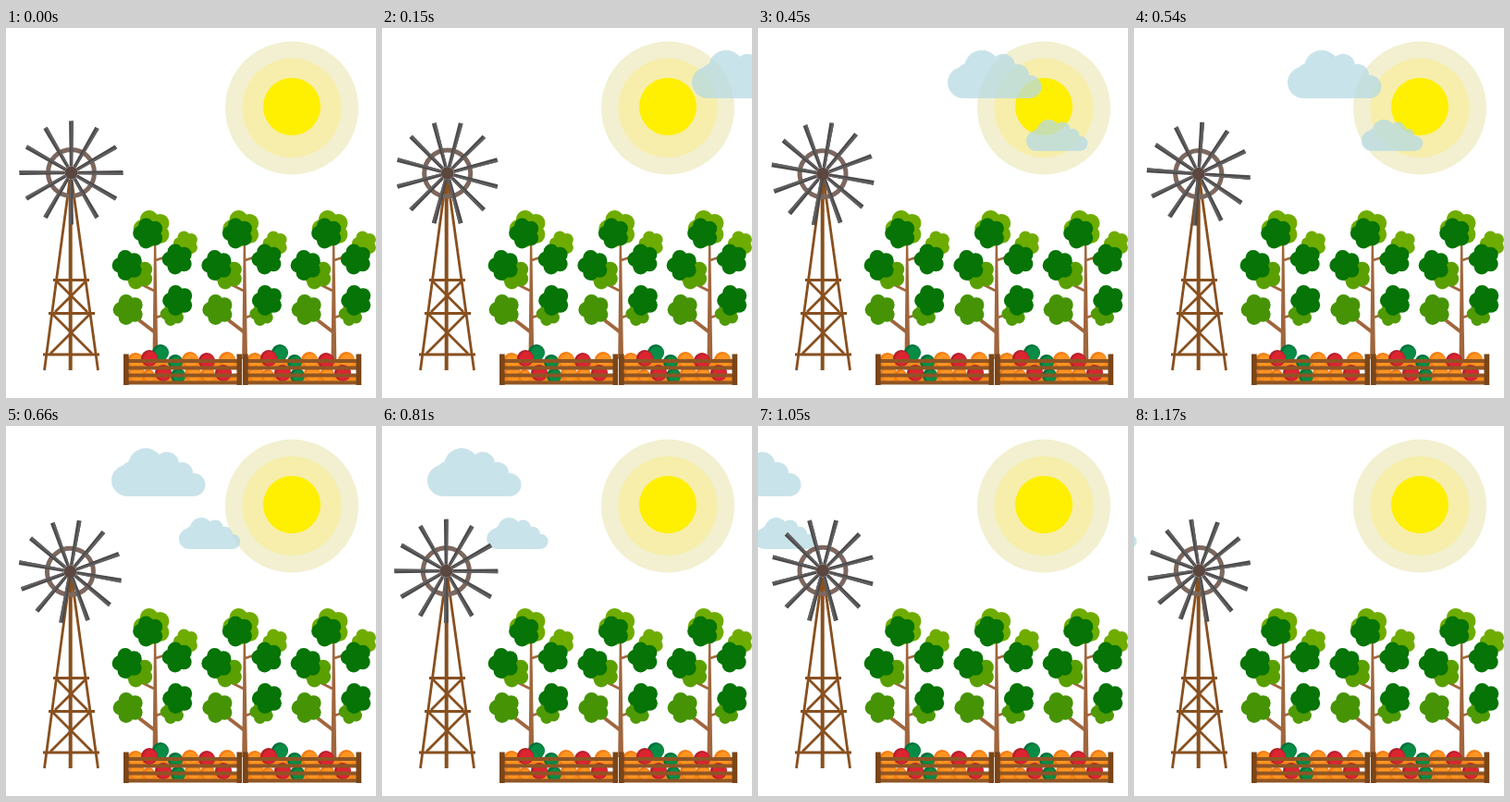
An HTML page for the animation above (1.2 s loop, 400 by 400 pixels).

```html
<!DOCTYPE html>
<html lang="en">
<head>
<meta charset="utf-8">
<title>Farm</title>
<style>
html, body { margin: 0; height: 100%; overflow: hidden; background: #fff; }
svg { display: block; width: 100vw; height: 100vh; }
</style>
</head>
<body>
<svg viewBox="0 0 400 400">
  <defs>
    <g id="cloud" fill="#b7dae4" opacity=".75">
      <circle cx="17" cy="59" r="17"/><circle cx="22" cy="50" r="12"/>
      <circle cx="37" cy="43" r="19"/><circle cx="60" cy="41" r="13"/>
      <circle cx="76" cy="51" r="12"/><circle cx="89" cy="63.5" r="12.5"/>
      <path d="M17 50H30V42H62V51H89V76H17Z"/>
    </g>
    <g id="tree"></g>
    <g id="crate"></g>
  </defs>

  <circle cx="309" cy="86.5" r="72" fill="#f2f0d0"/>
  <circle cx="309" cy="86.5" r="53.7" fill="#f6eeaa"/>
  <circle cx="309" cy="85" r="31" fill="#ffef00"/>

  <g id="big"><use href="#cloud"/></g>
  <g id="small"><use href="#cloud" transform="translate(0 83.3) scale(.654)"/></g>

  <g fill="none" stroke="#88501f" stroke-width="2.8">
    <path d="M69 164L41.5 370M71 164L99.5 370"/>
    <path d="M69.7 164V370" stroke-width="4"/>
    <path d="M51 272.5H90M46 308.5H96M40 353H101" stroke-width="3"/>
    <path d="M55 274L88 307M86 274L53 307M50 309L93 352M91 309L48 352"/>
  </g>
  <g id="rotor"></g>

  <use href="#tree"/><use href="#tree" x="96.7"/><use href="#tree" x="193"/>
  <use href="#crate"/><use href="#crate" x="129"/>
</svg>
<script>
const $ = id => document.getElementById(id);
const circle = (x, y, r, fill) => `<circle cx="${x}" cy="${y}" r="${r}" fill="${fill}"/>`;
const rect = (x, y, w, h, fill) => `<rect x="${x}" y="${y}" width="${w}" height="${h}" fill="${fill}"/>`;

// Leaf cluster: five petals around a core
function leaf(x, y, size, fill) {
  let out = circle(x, y, size * .6, fill);
  for (let i = 0; i < 5; i++) {
    const a = (36 + i * 72) * Math.PI / 180;
    out += circle(x + Math.cos(a) * size * .52, y + Math.sin(a) * size * .52, size * .5, fill);
  }
  return out;
}

const dark = '#067406', mid = '#469405', light = '#6fac00';
$('tree').innerHTML =
  `<g fill="none" stroke="#a0663d">
    <path d="M161 329L144 316" stroke-width="4"/>
    <path d="M160 284L146 277M162 313L178 308M162 251L174 247" stroke-width="2.8"/>
  </g>
  <path d="M160 232H162.3L164.3 358H158.5Z" fill="#a0663d"/>` +
  [
    [158, 217, 20, light], [194.5, 233, 13.5, light],
    [143, 266, 16.5, '#5a9f00'], [180, 309, 13, '#4f9a05'],
    [154, 222, 16.5, dark], [185.5, 250, 16.5, dark],
    [131.5, 256.5, 16.5, dark], [132.5, 304.5, 16.5, mid],
    [186, 294.5, 16.5, dark]
  ].map(l => leaf(...l)).join('');

const fruits = {
  orange: ['#f27c14', '#ff9420'],
  red: ['#b5202b', '#dc2430'],
  green: ['#03703a', '#078c45']
};
const fruit = (x, y, r, kind) =>
  circle(x, y, r, fruits[kind][0]) + circle(x + 1, y + .5, r - 1.6, fruits[kind][1]);

$('crate').innerHTML =
  rect(132, 360, 118, 6, '#f58a1c') + rect(132, 377, 118, 5, '#f58a1c') +
  [
    [167, 351, 9, 'green'], [140, 360, 9, 'orange'], [199, 359, 9, 'orange'],
    [239, 359, 9, 'orange'], [155, 357, 9, 'red'], [217, 360, 9, 'red'],
    [183, 361, 8, 'green'], [141, 374, 9, 'orange'], [154, 376, 7, 'orange'],
    [170, 373, 9, 'red'], [186, 376, 8, 'green'], [202, 374, 9, 'orange'],
    [218, 375, 8, 'orange'], [235, 373, 9, 'red']
  ].map(f => fruit(...f)).join('') +
  [358, 365.5, 373.5, 381.5].map(y => rect(127, y, 128, 4, '#8f5524')).join('') +
  [127, 249.5].map(x => rect(x, 352.5, 5.7, 33.5, '#7a4519')).join('');

let blades = '';
for (let a = 0; a < 360; a += 30) {
  blades += `<g transform="rotate(${a})">
    <path d="M-1.7-7L-2.4-56H2.4L1.7-7Z" fill="#4c4a4a"/>
    <path d="M0-7V-56H2.4L1.7-7Z" fill="#626060"/></g>`;
}
$('rotor').innerHTML = `<g transform="translate(70.5 156.5)">
  <circle r="25" fill="none" stroke="#7d675e" stroke-width="5"/>${blades}
  ${circle(0, 0, 7, '#5b4740')}</g>`;

const LOOP = 1200, STEP = 30;
const turns = [0, 90, 170, 270, 360]; // rotor angle at each quarter of the loop

function draw(now) {
  const t = Math.floor(now % LOOP / STEP) * STEP;
  const q = t / (LOOP / 4), i = Math.floor(q);
  const angle = turns[i] + (turns[i + 1] - turns[i]) * (q - i);
  $('rotor').setAttribute('transform', `rotate(${angle} 70 157)`);
  $('big').setAttribute('transform', `translate(${400 - t * 13 / 30} 0)`);
  $('small').setAttribute('transform', `translate(${511 - t * .491} 0)`);
}

const start = performance.now();
function tick() {
  draw(performance.now() - start);
  requestAnimationFrame(tick);
}
tick();
</script>
</body>
</html>
```
